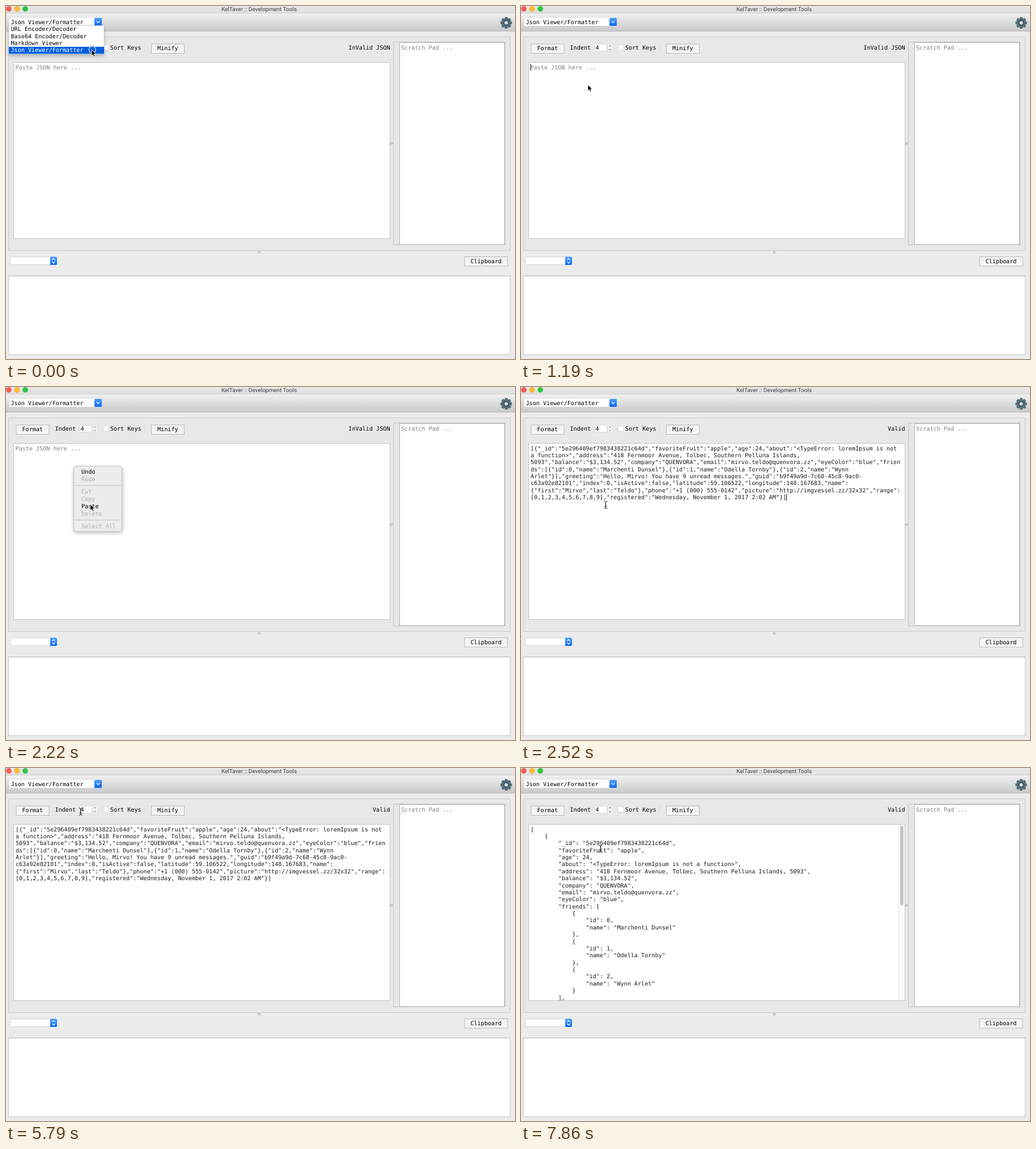
Animation, 898 px wide and 623 px high, one loop 8 s. Source, as an HTML page:

```html
<!DOCTYPE html>
<html lang="en">
<head>
<meta charset="utf-8">
<title>Development Tools</title>
<style>
  html, body { margin: 0; width: 100%; height: 100%; overflow: hidden; background: #ebebeb; }
  svg { display: block; width: 898px; height: 623px; }
  text {
    font: 10.13px "DejaVu Sans Mono", "Liberation Mono", monospace;
    white-space: pre; text-rendering: geometricPrecision; fill: #000;
  }
  .title { font: 10px Roboto, "Liberation Sans", sans-serif; fill: #3f3f3f; text-anchor: middle; }
  .hint { fill: #808080; }
  .code text { fill: #1c1c1c; }
  .off { fill: #b0b0b0; }
  .field { fill: #fff; stroke: #c3c3c3; }
  .chevron { fill: none; stroke: #fff; stroke-width: 1.2; stroke-linecap: round; stroke-linejoin: round; }
</style>
</head>
<body>
<svg viewBox="0 0 898 623">
  <defs>
    <linearGradient id="bar" x2="0" y2="1"><stop stop-color="#f1f1f1"/><stop offset="1" stop-color="#c9c9c9"/></linearGradient>
    <linearGradient id="head" x2="0" y2="1"><stop stop-color="#e9e8e9"/><stop offset="1" stop-color="#dfdfdf"/></linearGradient>
    <linearGradient id="blue" x2="0" y2="1"><stop stop-color="#4ea0fc"/><stop offset="1" stop-color="#0a67f3"/></linearGradient>
    <linearGradient id="face" x2="0" y2="1"><stop stop-color="#f0f0f0"/><stop offset="1" stop-color="#f6f6f6"/></linearGradient>
    <filter id="soft" x="-20%" y="-20%" width="140%" height="150%"><feGaussianBlur stdDeviation="3"/></filter>
    <clipPath id="page"><rect x="14" y="100" width="663" height="310"/></clipPath>
  </defs>

  <rect width="898" height="623" fill="#ebebeb"/>
  <rect width="898" height="13" fill="url(#head)"/>
  <rect y="13" width="898" height="31" fill="url(#bar)"/>
  <path d="M0 12.5H898" stroke="#cfcfcf"/>
  <path d="M0 44.5H898" stroke="#bdbdbd"/>
  <g stroke-width=".5">
    <circle cx="5" cy="5" r="4.6" fill="#fc5b57" stroke="#e2463f"/>
    <circle cx="19.5" cy="5" r="4.6" fill="#fdbd2e" stroke="#e0a029"/>
    <circle cx="34" cy="5" r="4.6" fill="#2bc840" stroke="#1eab30"/>
  </g>
  <text class="title" x="446.5" y="9">KelTaver :: Development Tools</text>

  <rect id="focus" x="4" y="19" width="167" height="18" rx="3" fill="none" stroke="#8fb9ee" stroke-width="2.5"/>
  <rect x="6" y="21" width="152" height="14" fill="#fff"/>
  <rect x="156" y="21" width="13" height="14" rx="1.5" fill="url(#blue)"/>
  <path class="chevron" d="M160 27l2.5 2.6l2.5-2.6"/>
  <text x="8.5" y="31.7">Json Viewer/Formatter</text>

  <g id="gear" transform="translate(882.5 29.8)"></g>

  <rect x="4.5" y="54.5" width="885" height="377" fill="#e8e8e8" stroke="#c9c9c9"/>

  <g id="buttons"></g>
  <text x="86.5" y="77.2">Indent</text>
  <rect x="130.5" y="67.5" width="21" height="12" fill="#fff" stroke="#dcdcdc"/>
  <text x="131.5" y="77.2">4</text>
  <rect x="153" y="67" width="8" height="13" rx="3" fill="#fff" stroke="#d6d6d6" stroke-width=".7"/>
  <path d="M155.2 71.4l1.8-2l1.8 2M155.2 75.8l1.8 2l1.8-2" fill="none" stroke="#444"/>
  <rect x="171.5" y="68.5" width="9.5" height="9.5" rx="2" fill="#fff" stroke="#cdcdcd" stroke-width=".8"/>
  <text x="183.8" y="77.2">Sort Keys</text>
  <path d="M244.5 66V81" stroke="#d6d6d6"/>
  <text id="status" x="677.5" y="77.2" text-anchor="end"></text>

  <rect class="field" x="13.5" y="99.5" width="664" height="311"/>
  <text id="empty" class="hint" x="16.5" y="111.7">Paste JSON here ...</text>
  <g clip-path="url(#page)">
    <g id="raw" class="code"></g>
    <g id="pretty" class="code">
      <rect x="666.5" y="99" width="12" height="312" fill="#fafafa" stroke="#e4e4e4"/>
      <rect x="669" y="102" width="5.6" height="140" rx="2.8" fill="#c1c1c1"/>
    </g>
  </g>
  <path id="caret" d="M0 0V12" stroke="#000"/>

  <rect x="683.5" y="63.5" width="197" height="358" fill="#e6e6e6" stroke="#c3c3c3"/>
  <rect x="694.5" y="64.5" width="185" height="356.5" fill="#fff" stroke="#b5b5b5"/>
  <text class="hint" x="697" y="77">Scratch Pad ...</text>
  <g fill="#c6c6c6" stroke="#b2b2b2" stroke-width=".6">
    <circle cx="680.3" cy="242.5" r="2"/>
    <circle cx="446.7" cy="434.5" r="2"/>
  </g>

  <rect x="7.5" y="443" width="82" height="13.5" rx="2.5" fill="#fff" stroke="#cdcdcd" stroke-width=".8"/>
  <path d="M78 442.5h9.5a2.5 2.5 0 0 1 2.5 2.5v9.500a2.500 2.500 0 0 1-2.500 2.500H78z" fill="url(#blue)"/>
  <path class="chevron" d="M81.700 448.200l2.300-2.600l2.300 2.600M81.700 451.400l2.300 2.600l2.300-2.600"/>
  <rect class="field" x="4.500" y="476.500" width="885" height="139"/>
  <path d="M4 476.500H890" stroke="#b0b0b0"/>

  <g id="popup">
    <rect x="5" y="37" width="168" height="51" rx="2" opacity=".25" filter="url(#soft)"/>
    <rect x="4.700" y="34.500" width="168.300" height="50.500" fill="#fff" stroke="#bcbcbc" stroke-width=".7"/>
    <rect x="5" y="72" width="168" height="12.400" fill="#0060df"/>
  </g>

  <g id="menu">
    <rect x="119" y="142" width="87" height="116" rx="6" opacity=".25" filter="url(#soft)"/>
    <rect x="119.500" y="139.500" width="85" height="115.500" rx="5" fill="#ececec" stroke="#c2c2c2"/>
    <path d="M120 173.700H204.500M120 234.800H204.500" stroke="#cfcfcf" stroke-width="1.500"/>
    <rect id="pick" x="120" y="204" width="84.500" height="13" fill="#0060df"/>
  </g>

  <g id="ring" fill="none">
    <circle cx="152.300" cy="77" r="7" stroke="#123a78" stroke-width=".8"/>
    <circle cx="152.300" cy="77" r="6.100" stroke="#fff" stroke-width="1.100"/>
  </g>
  <path id="arrow" d="M0 0V10.800L2.500 8.600L4.200 12.400L6.200 11.500L4.500 7.800H7.800Z" stroke="#fff" stroke-width=".9" stroke-linejoin="round"/>
  <g id="beam" fill="none" stroke-linecap="round">
    <path d="M-2.500-6.300Q0-6.300 0-4.600V4.600Q0 6.300-2.500 6.300M2.500-6.300Q0-6.300 0-4.600V4.600Q0 6.300 2.500 6.300M-1.500 2.500H1.500" stroke="#fff" stroke-width="2" opacity=".6"/>
    <path d="M-2.500-6.300Q0-6.300 0-4.600V4.600Q0 6.300-2.500 6.300M2.500-6.300Q0-6.300 0-4.600V4.600Q0 6.300 2.500 6.300M-1.500 2.500H1.500" stroke="#111"/>
  </g>
</svg>

<script>
const LOOP = 8000, LINE = 12.375, COLS = 107;
const $ = id => document.getElementById(id);
const NS = $('raw').namespaceURI;

function add(parent, tag, attrs, content = '') {
  const el = document.createElementNS(NS, tag);
  for (const key in attrs) el.setAttribute(key, attrs[key]);
  el.textContent = content;
  parent.append(el);
  return el;
}

const user = {
  _id: '5e296409ef7983438221c64d',
  favoriteFruit: 'apple',
  age: 24,
  about: '<TypeError: loremIpsum is not a function>',
  address: '418 Fernmoor Avenue, Tolbec, Southern Pelluna Islands, 5093',
  balance: '$3,134.52',
  company: 'QUENVORA',
  email: 'mirvo.teldo@quenvora.zz',
  eyeColor: 'blue',
  friends: ['Marchenti Dunsel', 'Odella Tornby', 'Wynn Arlet'].map((name, id) => ({ id, name })),
  greeting: 'Hello, Mirvo! You have 9 unread messages.',
  guid: 'b9f49a9d-7c68-45c8-9ac0-c63a92e82101',
  index: 0,
  isActive: false,
  latitude: 59.106522,
  longitude: 148.167683,
  name: { first: 'Mirvo', last: 'Teldo' },
  phone: '+1 (000) 555-0142',
  picture: 'http:\/\/imgvessel.zz/32x32',
  range: [...Array(10).keys()],
  registered: 'Wednesday, November 1, 2017 2:02 AM'
};

// Wrap after a space or hyphen, before a bracket, else at the full width.
const wrap = new RegExp(`.{1,${COLS}}(?:[ -]|(?=[\\[{])|$)|.{${COLS}}`, 'g');
const write = (group, lines) => lines.forEach((line, i) =>
  add(group, 'text', { x: 17, y: 111.5 + i * LINE }, line));
write($('raw'), JSON.stringify([user]).match(wrap));
write($('pretty'), JSON.stringify([user], null, 4).split('\n').slice(0, 25));

function button(x, y, w, label) {
  const face = add($('buttons'), 'rect', { x: x + .5, y: y + .5, width: w, height: 16.5, fill: 'url(#face)', stroke: '#b9b9b9' });
  add($('buttons'), 'text', { x: x + 11, y: y + 11.7 }, label);
  return face;
}
const format = button(17.5, 66.5, 58, 'Format');
button(256, 66.5, 58, 'Minify');
button(808.5, 442, 76, 'Clipboard');

['URL Encoder/Decoder', 'Base64 Encoder/Decoder', 'Markdown Viewer', 'Json Viewer/Formatter'].forEach((label, i) =>
  add($('popup'), 'text', { x: 8.5, y: 44.2 + i * 12.35, style: i === 3 ? 'fill:#fff' : '' }, label));

const items = { Undo: 149, Redo: 162, Cut: 184, Copy: 197, Paste: 210, Delete: 223.3, 'Select All': 245 };
for (const label in items) {
  const on = label === 'Undo' || label === 'Paste';
  items[label] = add($('menu'), 'text', { x: 133, y: items[label] + 3.7, class: on ? '' : 'off' }, label);
}

for (let a = 0; a < 360; a += 45)
  add($('gear'), 'path', { d: 'M-3.2-6L-2.2-10.2H2.2L3.2-6Z', fill: '#546e7a', transform: `rotate(${a})` });
add($('gear'), 'circle', { r: 7.8, fill: '#546e7a' });
add($('gear'), 'circle', { r: 5, fill: '#3f535d' });
add($('gear'), 'circle', { r: 3, fill: '#dde1e3' });

// Pointer moves: first step, last step, number of steps, x, y.
const moves = [
  [150, 440, 3, 118, 139], [1480, 1920, 4, 148.7, 207], [2520, 2520, 1, 149.5, 208],
  [2670, 2970, 3, 130, 146], [3415, 3710, 3, 234, 187], [4010, 4610, 5, 192, 119.5],
  [4760, 4900, 2, 188, 90], [5200, 5790, 5, 131.7, 77], [5930, 6080, 2, 68, 66],
  [6380, 6380, 1, 54, 69], [7120, 7270, 2, 157, 144], [7570, 7570, 1, 157, 158],
  [7715, 7860, 2, 140.3, 142.5]
];
function pointer(t) {
  let x = 151, y = 77;
  for (const [from, to, n, mx, my] of moves) {
    if (t < from) break;
    const step = n > 1 ? Math.min(n, 1 + Math.floor((t - from) * (n - 1) / (to - from))) : 1;
    x += (mx - x) * step / n;
    y += (my - y) * step / n;
  }
  return `translate(${x} ${y})`;
}

// Caret: on, off, x, y.
const carets = [[740, 1480, 17, 102], [2520, 2820, 468.5, 189], [3270, 4010, 133.5, 139.5], [4460, 5200, 133.5, 139.5]];

const show = (id, on) => $(id).setAttribute('visibility', on ? 'visible' : 'hidden');

function draw(t) {
  const within = (a, b) => t >= a && t < b;
  const pasted = t >= 2520, pretty = t >= 6820;

  show('popup', t < 290);
  $('popup').setAttribute('opacity', t < 150 ? 1 : .5);
  show('ring', t < 150);
  show('focus', within(290, 740));

  show('menu', within(1340, 2520));
  $('menu').setAttribute('opacity', t < 2370 ? 1 : .5);
  const hot = within(1920, 2220);
  show('pick', hot);
  items.Paste.style.fill = hot ? '#fff' : '';

  show('empty', !pasted);
  show('raw', pasted && !pretty);
  show('pretty', pretty);
  $('status').textContent = pasted ? 'Valid' : 'InValid JSON';
  format.setAttribute('fill', within(6680, 6820) ? '#d2d2d2' : 'url(#face)');

  const caret = carets.find(([on, off]) => within(on, off));
  show('caret', caret);
  if (caret) $('caret').setAttribute('transform', `translate(${caret[2]} ${caret[3]})`);

  const arrow = t < 440 || within(1190, 2520) || within(6080, 7120);
  show('arrow', arrow);
  show('beam', !arrow);
  $(arrow ? 'arrow' : 'beam').setAttribute('transform', pointer(t));
}

function tick() {
  draw(performance.now() % LOOP);
  requestAnimationFrame(tick);
}
tick();
</script>
</body>
</html>
```
